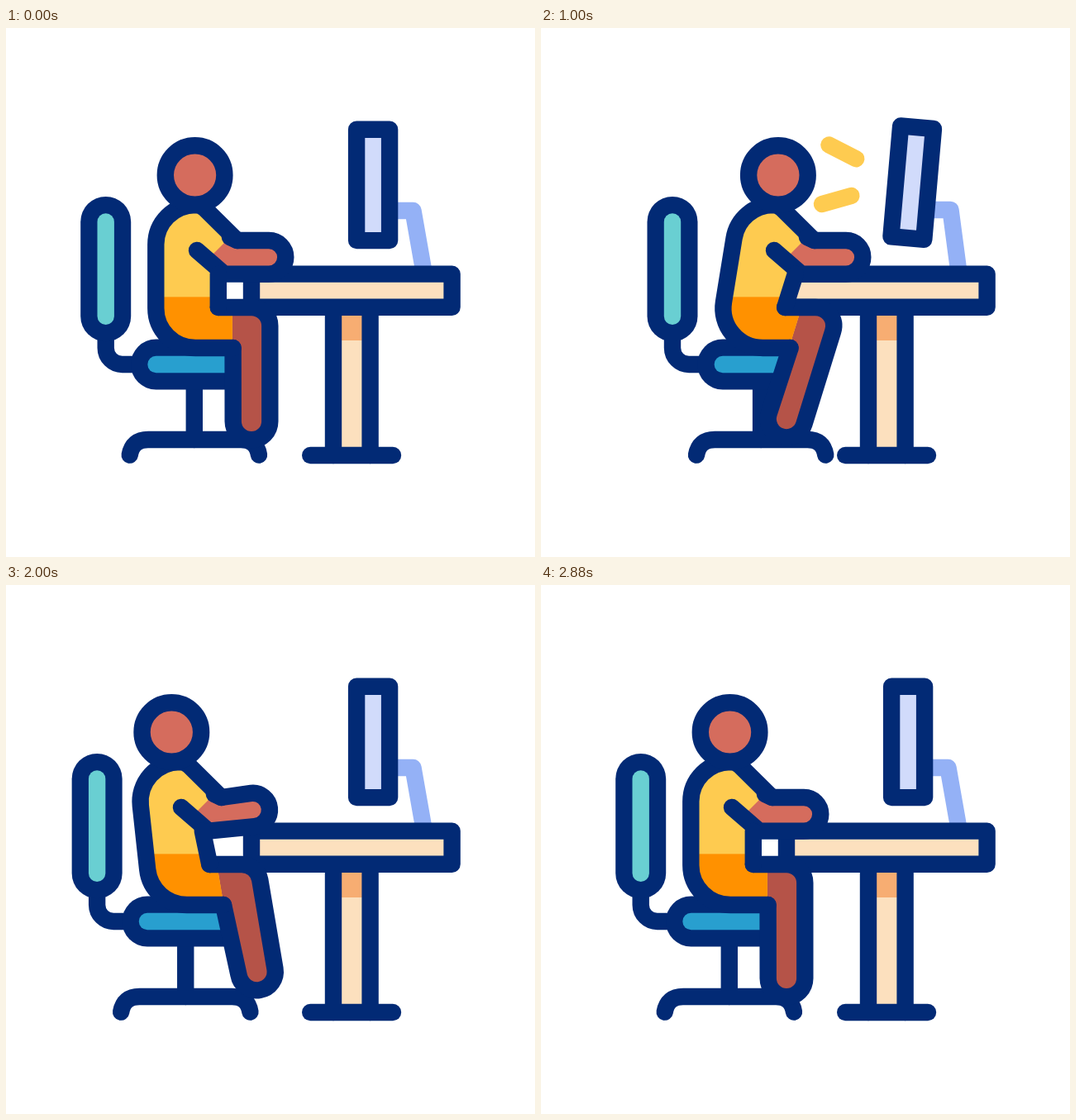
Write an HTML page with a canvas that moves like this. It is 640x640 px and loops after 3 s.

```html
<!DOCTYPE html>
<html lang="en">
<head>
<meta charset="utf-8">
<title>Desk posture</title>
<style>
html, body { margin: 0; width: 100%; height: 100%; overflow: hidden; background: #fff; }
canvas { display: block; width: 100vw; height: 100vh; }
</style>
</head>
<body>
<canvas id="stage" width="640" height="640"></canvas>
<script>
const ctx = document.getElementById('stage').getContext('2d');
const LOOP = 3000, LINE = 20.4;
const NAVY = '#022a75', SKIN = '#d56c5d', SHIN = '#b55348', YELLOW = '#fecb50',
  ORANGE = '#ff9100', TEAL = '#69cfd2', CUSHION = '#289fcf', WOOD = '#fce0be',
  WOOD_SHADE = '#f7ad72', SCREEN = '#d1dbfb', STAND = '#94b1f6';

// horizontal offsets of the body parts, foot lift and forearm angle in degrees
const REST = { seat: 0, shoulder: 0, head: 0, shin: 0, knee: 0, footX: 0, footY: 0, arm: 0 };
const FORWARD = { seat: 38.3, shoulder: 51, head: 58.3, shin: 27, knee: 35, footX: 0, footY: -3, arm: 0 };
const BACK = { seat: -19.6, shoulder: -32, head: -44.3, shin: -18.7, knee: -20.5, footX: 7.7, footY: -8.9, arm: -6.8 };

const mix = (a, b, p) => a + (b - a) * p;

// cubic-bezier(.4, 0, .32, 1)
function ease(x) {
  if (x <= 0) return 0;
  if (x >= 1) return 1;
  let lo = 0, hi = 1;
  for (let i = 0; i < 24; i++) {
    const u = (lo + hi) / 2, v = 1 - u;
    if (3 * v * v * u * 0.4 + 3 * v * u * u * 0.32 + u * u * u < x) lo = u;
    else hi = u;
  }
  return lo * lo * (3 - 2 * lo);
}
const between = (t, from, to) => ease((t - from) / (to - from));

function poseAt(t) {
  const blend = (a, b, p) =>
    Object.fromEntries(Object.keys(a).map(k => [k, mix(a[k], b[k], p)]));
  if (t < 1630) {
    const pose = blend(REST, FORWARD, between(t, 200, 690));
    if (t > 690) pose.arm = -4 * Math.sin(Math.PI * (t - 690) / 313.3) ** 2;
    return pose;
  }
  if (t < 2235) return blend(FORWARD, BACK, between(t, 1630, 2235));
  return blend(BACK, REST, between(t, 2235, 2860));
}

function stroke(color = NAVY, width = LINE, path) {
  ctx.strokeStyle = color;
  ctx.lineWidth = width;
  path ? ctx.stroke(path) : ctx.stroke();
}
function polyline(points, color, width) {
  ctx.beginPath();
  points.forEach(([x, y]) => ctx.lineTo(x, y));
  stroke(color, width);
}
function fill(path, color) {
  ctx.fillStyle = color;
  ctx.fill(path);
}
function box(x, y, w, h, color) {
  ctx.fillStyle = color;
  ctx.fillRect(x, y, w, h);
}

function drawChair(shift) {
  ctx.save();
  ctx.translate(shift, 0);
  ctx.beginPath();
  ctx.moveTo(120.7, 365);
  ctx.lineTo(120.7, 387);
  ctx.arcTo(120.7, 407, 141, 407, 20);
  ctx.lineTo(165, 407);
  stroke();
  const back = [[120.7, 234.4], [120.7, 348.8]], seat = [[181.5, 407], [274, 407]];
  polyline(back, NAVY, 61);
  polyline(back, TEAL, LINE);
  polyline([[227.8, 420], [227.8, 498]]);
  polyline(seat, NAVY, 61);
  polyline(seat, CUSHION, LINE);
  ctx.beginPath();
  ctx.moveTo(149.7, 516.6);
  ctx.quadraticCurveTo(153, 498, 172, 498);
  ctx.lineTo(284, 498);
  ctx.quadraticCurveTo(303, 498, 306, 516.6);
  stroke();
  ctx.restore();
}

function drawMonitor(t) {
  const tilt = between(t, 690, 990) - between(t, 1730, 2000);
  polyline([[mix(466, 470, tilt), mix(221, 220, tilt)],
    [mix(492.5, 495.5, tilt), mix(221, 220, tilt)], [505, 292]], STAND);
  ctx.save();
  ctx.translate(478, 247);
  ctx.rotate(tilt * 5 * Math.PI / 180);
  ctx.translate(-478, -247);
  const frame = new Path2D();
  frame.rect(424.1, 122.7, 40, 134.4);
  fill(frame, SCREEN);
  stroke(NAVY, LINE, frame);
  ctx.restore();
}

function drawDesk() {
  box(396, 338, 44.6, 179, WOOD);
  box(396, 338, 44.6, 40, WOOD_SHADE);
  polyline([[396, 338], [396, 517]]);
  polyline([[440.6, 338], [440.6, 517]]);
  polyline([[368.2, 517], [468, 517]]);
  const top = new Path2D();
  top.rect(297, 297.6, 242.6, 40.2);
  fill(top, WOOD);
  stroke(NAVY, LINE, top);
}

function drawPerson(pose) {
  const { seat, shoulder, head } = pose;
  const kneeX = 297 + pose.knee, kneeY = 360;
  const foot = { x: 297 + pose.footX, y: 476 + pose.footY };
  const slope = (foot.x - kneeX) / (foot.y - kneeY);
  const shinX = 274.6 + pose.shin, lapX = 256.8 + seat, chestX = 256.8 + shoulder;
  const r = 22.3, turn = -Math.atan(slope);

  const leg = new Path2D();
  leg.moveTo(shinX, 387);
  leg.arc(foot.x, foot.y, r, Math.PI + turn, turn, true);
  const sideX = kneeX + r * Math.cos(turn), sideY = kneeY + r * Math.sin(turn);
  leg.arcTo(sideX + (338 - sideY) * slope, 338, lapX, 338, r);
  leg.lineTo(lapX, 338);

  const lean = (shoulder - seat) / 78;
  const outline = () => {
    const p = new Path2D();
    p.moveTo(279.5 + shoulder, 257);
    p.lineTo(241 + shoulder, 219);
    p.quadraticCurveTo(236 + shoulder, 214, 229 + shoulder, 214);
    p.arcTo(181.3 + shoulder + 48 * lean, 214, 181.3 + seat, 340, 48);
    p.arcTo(181.3 + seat - 47 * lean, 387, shinX, 387, 48);
    p.lineTo(shinX, 387);
    return p;
  };
  const back = outline(), torso = outline();
  const hemX = 273.8 + seat - 38 * Math.max(0, slope);
  torso.lineTo(hemX + 39 * slope, 387);
  torso.lineTo(hemX - 10 * slope, 338);
  torso.lineTo(lapX, 338);
  torso.lineTo(chestX, 297.6);
  torso.closePath();

  const angle = pose.arm * Math.PI / 180;
  const handX = 265 + shoulder + 53 * Math.cos(angle), handY = 277.3 + 53 * Math.sin(angle);
  const forearm = new Path2D();
  forearm.moveTo(271 + shoulder, 253);
  forearm.lineTo(279.5 + shoulder, 257);
  forearm.arc(handX, handY, 20.3, angle - Math.PI / 2, angle + Math.PI / 2);
  forearm.lineTo(264 + shoulder, 297.6);
  const sleeve = new Path2D(forearm);
  forearm.lineTo(231 + shoulder, 269);
  sleeve.lineTo(246 + shoulder, 278);

  fill(leg, SHIN);
  fill(torso, YELLOW);
  ctx.save();
  ctx.clip(torso);
  box(100, 325.4, 350, 70, ORANGE);
  ctx.restore();
  fill(sleeve, SKIN);

  [leg, back, forearm].forEach(path => stroke(NAVY, LINE, path));
  polyline([[lapX, 338], [chestX, 297.6]]);

  const face = new Path2D();
  face.arc(228.6 + head, 178, 35.8, 0, Math.PI * 2);
  fill(face, SKIN);
  stroke(NAVY, LINE, face);
}

function drawRays(t) {
  const front = between(t, 700, 1360), tail = between(t, 1130, 1790);
  if (front - tail < 0.01) return;
  const ray = (x1, y1, x2, y2) => polyline([tail, front].map(
    p => [mix(x1, x2, p), mix(y1, y2, p)]), YELLOW);
  ray(348.5, 141.5, 401, 168.3);
  ray(340, 213, 396.7, 197);
}

function draw(now) {
  const t = now % LOOP, pose = poseAt(t);
  box(0, 0, 640, 640, '#fff');
  ctx.lineCap = ctx.lineJoin = 'round';
  drawChair(pose.seat);
  drawMonitor(t);
  drawDesk();
  drawPerson(pose);
  drawRays(t);
}

const start = performance.now();
function tick() {
  draw(performance.now() - start);
  requestAnimationFrame(tick);
}
tick();
</script>
</body>
</html>
```
